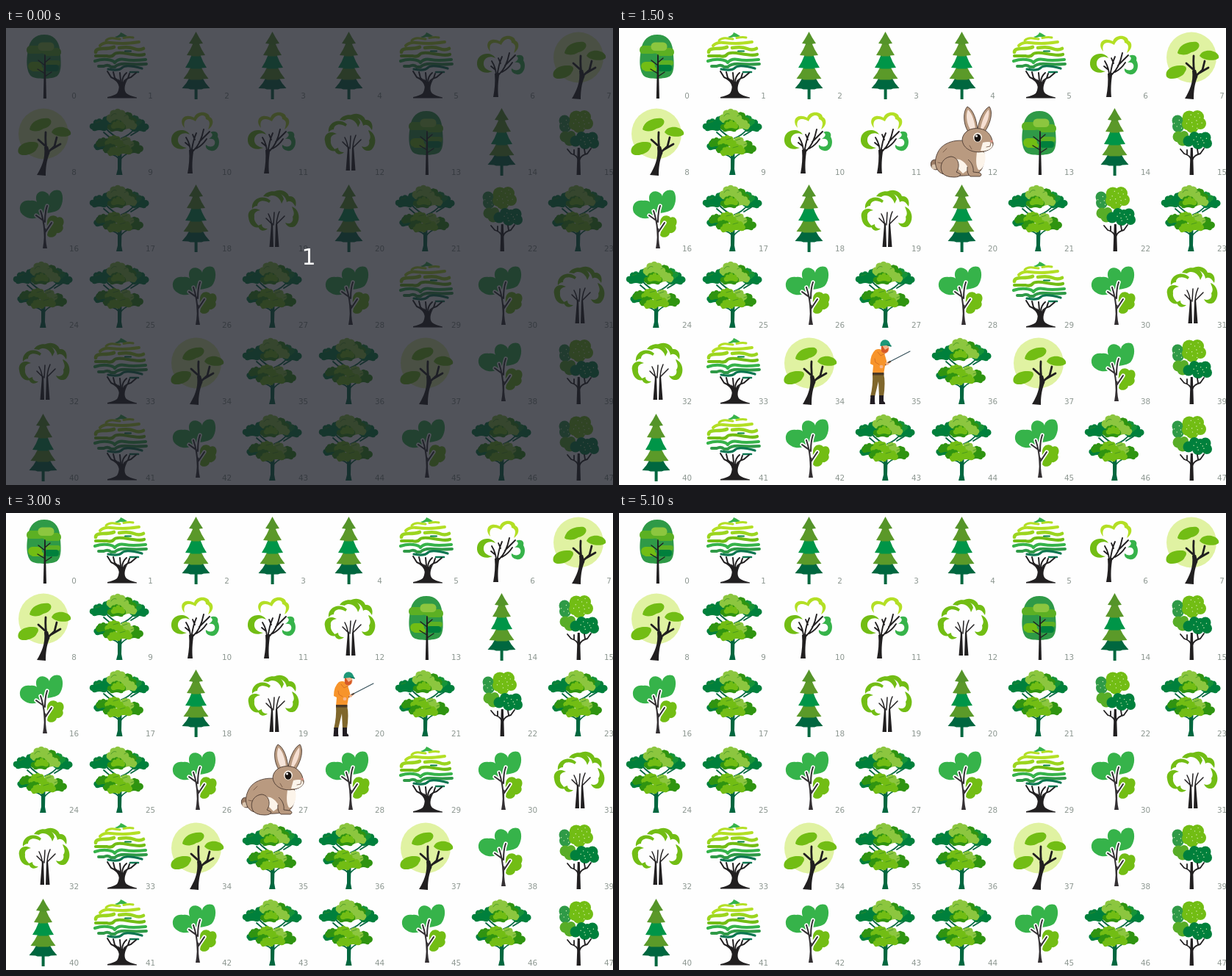
These frames come from a looping animation (826 px wide and 622 px high, 7400 ms). An HTML page:

```html
<!DOCTYPE html>
<html lang="en">
<head>
<meta charset="utf-8">
<title>Forest chase</title>
<style>
  html, body { margin: 0; width: 100%; height: 100%; overflow: hidden; background: #fefefe; }
  svg { display: block; width: 826px; height: 622px; }
  text { font-family: "DejaVu Sans", sans-serif; text-anchor: middle; }
</style>
</head>
<body>
<svg id="stage" viewBox="0 0 826 622" xmlns="http://www.w3.org/2000/svg"></svg>
<script>
const LOOP = 7400, STEP = 100, START = 300;
const COLS = 8, CELL = 104, COUNT = 48;
const FOREST = "ABCCCBDE" + "EFDDGACH" + "IFCGCFHF" + "FFIFIBIG" + "GBEFFEIH" + "CBIFFIFH";

const BARK = "#211f20", LIME = "#b3df25", LEAF = "#72bd14", LIGHT = "#8cc63f",
      GREEN = "#36b34a", MID = "#2f9a47", DEEP = "#00803c", TEAL = "#00673f", MOSS = "#2f9410";

const fill = (d, color) => `<path d="${d}" fill="${color}"/>`;
const line = (d, width, color = BARK) =>
  `<path d="${d}" fill="none" stroke="${color}" stroke-width="${width}" stroke-linecap="round" stroke-linejoin="round"/>`;
const oval = (x, y, rx, ry, color, turn = 0, extra = "") =>
  `<ellipse cx="${x}" cy="${y}" rx="${rx}" ry="${ry}" fill="${color}" transform="rotate(${turn} ${x} ${y})" ${extra}/>`;
const pill = (x, y, w, h, r, color) =>
  `<rect x="${x}" y="${y}" width="${w}" height="${h}" rx="${r}" fill="${color}"/>`;
const lobes = (color, ...circles) => circles.map(([x, y, r]) => oval(x, y, r, r, color)).join("");

// Leaf cloud with a scalloped dome and a shallow base
function cloud(left, top, right, base, color, bumps = 5) {
  const cx = (left + right) / 2, rx = (right - left) / 2 - 1, h = base - top - 3;
  let d = `M${left + 1} ${base - 2}`;
  for (let i = 1; i <= bumps; i++) {
    const a = Math.PI * (1 - i / bumps);
    const r = (Math.PI * (rx + h) / 2 / bumps * 0.56).toFixed(1);
    d += `A${r} ${r} 0 0 1 ${(cx + rx * Math.cos(a)).toFixed(1)} ${(base - 2 - h * Math.sin(a)).toFixed(1)}`;
  }
  return fill(d + `Q${right - 2} ${base + 1} ${cx + rx / 2} ${base}Q${cx} ${base - 2} ${cx - rx / 2} ${base}Q${left + 2} ${base + 1} ${left + 1} ${base - 2}Z`, color);
}

function dots(x, y, rx, ry, n) {
  let out = "";
  for (let i = 0; i < n; i++) {
    const a = i * 2.4, k = Math.sqrt((i + 0.6) / n) * 0.85;
    out += oval((x + rx * k * Math.cos(a)).toFixed(1), (y + ry * k * Math.sin(a)).toFixed(1), 0.7, 0.7, "#d8efb8");
  }
  return out;
}

function pillTree() {
  return fill("M52 9C64 9 72 16 73.5 31C75 47 76 59 70 65C64 70 41 70 35 66C28 61 27 45 30 30C32 16 40 9 52 9Z", MID)
    + fill("M33 24H45Q47 28 54 27H70Q75 28 75 33T70 38H55Q51 33 46 35H33Q28 35 28 30T33 24Z", "#5cb023")
    + pill(43.5, 19.5, 22, 11.5, 5.5, LIGHT)
    + pill(30, 46, 19, 12, 6, LEAF) + pill(34, 53, 17, 6, 3, LEAF)
    + pill(54, 44, 20, 7, 3.5, "#5cb023") + pill(53, 50, 19, 9, 4, DEEP)
    + line("M53 38V70M53 51L44 44M53 47L60 41M53 62L43 56M53 66L62 60", 1.4)
    + fill("M52.3 36H53.5L55 96H50.8Z", BARK);
}

function bonsai() {
  return fill("M44 12Q51 10 52 6Q55 7 61 11Q58 13 52 12Q47 14 44 12Z", GREEN)
    + line("M32 17Q36 13 43 14T51 15M56 13.5Q64 12 69 13", 3, LIME)
    + line("M24 24Q29 19 38 20T55 21T77 19", 4, LIME)
    + line("M18 33Q18 28 28 28T43 26M50 27Q63 25 70 28T83 28", 4.6, "#9bd51f")
    + line("M18 38H33Q40 40 43 36T62 35T84 36", 4.2, LEAF)
    + line("M58 31.5H66", 2, DEEP)
    + line("M17 45Q26 42 34 43T44 47Q49 41 58 43T86 43", 4.2, GREEN)
    + line("M22 52H29Q35 49 39 53H44Q49 48 61 49T87 49", 4, MID)
    + line("M35 56Q49 59 54 54T81 55", 3.2, "#0b7650")
    + line("M65 60H76", 2.6, "#0b7650")
    + line("M51 80Q49 71 39 67L34 59M51 74L44 68L42 60M54 80Q56 69 66 67L73 61M54 74Q54 66 60 61M62 68L64 62M52 72L51 61", 2)
    + fill("M48 69C51 76 50 85 47 89Q43 92 34 94V95.5H74V94.5Q64 92 60 89C56 85 57 77 62 69L55 75L53 73Z", BARK);
}

function pine() {
  // top, base, half-width above and below
  const tiers = [[68, 83, 9, 19, TEAL], [53, 70, 7, 17, "#5b9a29"], [37, 55, 6, 14.5, "#009548"], [21, 38, 4, 12.5, "#5b9829"], [5, 22, 0, 9.5, "#559429"]];
  return pill(48.6, 80, 4, 17, 0.5, TEAL) + tiers.map(([top, base, a, b, color]) =>
    fill(`M${50.5 - a} ${top}H${50.5 + a}Q${50.5 + (a + b) * .45} ${(top + base) / 2} ${50.5 + b} ${base - 1}`
      + `L${50.5 + b * .55} ${base - .5}L${50.5 + b * .4} ${base + .5}H${50.5 - b * .4}L${50.5 - b * .55} ${base - .5}L${50.5 - b} ${base - 1}`
      + `Q${50.5 - (a + b) * .45} ${(top + base) / 2} ${50.5 - a} ${top}Z`, color)).join("");
}

function heartOutline() {
  return fill("M35 32C26 22 34 11 48 18C51 8 68 9 69 17C76 20 74 30 67 34C70 26 70 22 64 20C64 13 54 13 50 23C40 17 32 20 35 32Z", LIME)
    + fill("M42 41C36 31 18 34 17 47C16 58 27 64 38 59C30 58 25 53 26 47C27 40 35 37 42 41Z", LEAF)
    + fill("M70 38C76 35 82 38 80 44C85 52 80 65 71 63C66 62 63 59 64 55C70 60 78 57 76 50C75 47 72 46 68 47C74 43 74 40 70 38Z", GREEN)
    + line("M43 69Q44 56 37 45M42 57L36 52M44 68Q46 50 51 39M49 48L46 41M47 63Q57 54 61 34M55 51L69 37M51 60Q59 56 65 47", 1.9)
    + fill("M41 62L47.5 61C45.5 74 45 83 46 94H39C41 83 42 73 41 62Z", BARK);
}

function sunTree() {
  return oval(51, 40, 34, 34.5, "#e0f2a2")
    + fill("M32 34C34 22 48 18 58 19C65 22 61 31 51 33C44 38 35 37 32 34Z", LEAF)
    + fill("M62 38C64 31 75 29 81 32C87 34 89 38 88 41C82 46 67 44 62 38Z", LEAF)
    + fill("M17 66C14 57 25 50 37 51C44 51 46 55 42 60C40 67 22 73 17 66Z", LEAF)
    + line("M56 68Q53 52 54 38M54 57L44 48M55 67L66 57L69 45M62 61L74 54", 2.8)
    + fill("M52 58L57 57L59.5 66C55 76 54 87 54 97L42 96C48 86 54 74 52 58Z", BARK);
}

function oak() {
  return line("M50 76C48 68 38 69 30 63M51 76Q56 68 68 64M49 46Q41 42 32 33M53 46Q64 42 70 34M36 44L29 38M66 42L76 36", 1.8, TEAL)
    + fill("M48 66H53.5L53 88L54.5 96H46L48 88Z", TEAL)
    + cloud(12, 19, 34, 36, DEEP) + cloud(25, 15, 43, 31, DEEP)
    + cloud(66, 19, 88, 37, DEEP) + cloud(62, 14, 79, 29, "#159437")
    + cloud(53, 9, 70, 30, MOSS) + cloud(34, 6, 62, 25, LIGHT)
    + cloud(53, 20, 74, 34, LIGHT) + cloud(36, 20, 57, 37, MOSS) + cloud(38, 23, 59, 33, LEAF)
    + cloud(16, 47, 38, 62, DEEP) + cloud(18, 45, 39, 58, MOSS)
    + cloud(61, 48, 80, 67, MOSS) + cloud(50, 43, 68, 60, LIGHT)
    + cloud(31, 42, 55, 58, LEAF) + cloud(28, 53, 48, 66, MOSS)
    + cloud(44, 54, 68, 68, LEAF) + cloud(34, 57, 53, 70, LEAF)
    + line("M39 16Q42 11 46 13M57 16L61 14M18 25L24 23M71 23L77 21M24 50L31 48M42 48L49 46M55 49L61 47M66 55L72 53M51 59L58 57", 0.7, "#388b22");
}

function cloudOutline() {
  return fill("M34 40C23 34 16 42 18 50C19 59 25 65 33 63C29 58 25 55 26 49C25 43 29 41 34 40Z", LEAF)
    + fill("M23 38C21 25 37 17 48 27L46 30C39 25 30 27 30 34Q26 34 23 38Z", LEAF)
    + fill("M38 21C45 10 64 13 66 25L63 31C61 22 51 17 45 22Z", LEAF)
    + fill("M51 16C60 9 71 14 73 21C81 20 84 28 82 35C78 28 74 26 70 29C69 21 62 16 51 16Z", LEAF)
    + fill("M77 35C88 39 89 54 82 61C78 65 70 63 68 57C74 60 80 56 78 49C82 44 78 39 77 35Z", LEAF)
    + fill("M31 61C32 68 39 70 44 65C39 65 36 63 36 59Z", LEAF)
    + line("M50 68Q50 54 45 45M49 58L42 51M56 68Q55 53 60 42M57 58L67 48M52 60L53 43", 1.5)
    + fill("M49 59L51 57L52 90H46.5ZM55 59L57 57L59.5 90H54Z", BARK);
}

function dottedTree() {
  return lobes(MID, [32, 22, 7.5], [33, 30, 8], [39, 25, 7])
    + lobes("#58ad27", [33, 44, 7.5], [39, 49, 7.5], [41, 42, 6])
    + lobes(LEAF, [48, 18, 9.5], [59, 17, 9], [63, 26, 8], [52, 30, 9], [46, 27, 8])
    + lobes(DEEP, [47, 50, 7.5], [55, 44, 7], [60, 53, 8], [70, 45, 7.5], [72, 53, 7], [63, 45, 6])
    + dots(55, 22, 15, 13, 12) + dots(34, 27, 8, 9, 5) + dots(63, 49, 14, 7, 8)
    + line("M51 76Q49 69 41 67L36 61M52 76Q54 69 63 67L68 60M45 68L45 62M60 67L59 61", 1.8)
    + fill("M49.8 59H52.8L54 96H48.5Z", BARK);
}

function heartTree() {
  const twigs = "M53 76Q52 55 47 41M52 55L41 47M53 56Q53 42 56 34M54 69L62 57";
  return fill("M48 46C41 54 27 53 20 43C16 33 23 25 33 27C38 26 41 28 42 29C38 18 46 12 53 15Q58 17 59 21C60 13 71 10 75 15C79 22 77 33 72 39C66 44 56 43 48 46Z", GREEN)
    + fill("M56 57C56 47 66 45 70 50C77 47 81 55 77 61C80 67 73 72 69 71C68 77 59 79 56 74C58 67 55 62 56 57Z", LEAF)
    + line(twigs, 5.4, "#fefefe") + line(twigs, 2.1, "#343033")
    + fill("M51.5 64L54.5 65C53.5 75 54 84 56 92H50C52 82 52 72 51.5 64Z", "#343033");
}

function rabbit() {
  const ink = `stroke="#49382f" stroke-width="0.9"`, fur = "#b99a80", cream = "#fcf4ea";
  const inked = (d, color) => `<path d="${d}" fill="${color}" ${ink}/>`;
  return oval(14.5, 82, 6, 7, "#9b7c65", -25, ink) + oval(13, 85, 3.5, 3.5, "#d8c4ae")
    + inked("M72 34C74 20 81 6 88 3C94 12 88 29 81 38Z", fur)
    + fill("M76 33C78 21 83 11 87 7C89 14 85 26 79 34Z", "#f6dfd2")
    + inked("M59 37C52 26 52 9 58 3C66 7 71 21 72 36Z", fur)
    + fill("M62 34C56 24 56 12 59 7C65 13 68 23 69 34Z", "#f6e5da")
    + inked("M56 50C42 47 24 52 18 65C11 79 15 92 26 95C43 99 64 97 72 94C82 87 82 72 80 62Z", fur)
    + fill("M71 65C77 66 81 63 82 68C84 78 79 90 73 89C69 83 70 73 71 65Z", cream)
    + fill("M36 78C43 71 54 75 60 88L52 94Z", cream)
    + inked("M24 93C19 83 25 72 36 71C46 72 49 84 43 92L49 95Q48 99 40 99Q28 99 24 93Z", fur)
    + inked("M59 75C64 79 67 86 66 92L75 93Q79 96 75 98H62Q57 94 58 85", fur)
    + inked("M51 48C52 37 63 31 75 33C84 34 91 42 92 50C96 56 89 63 80 64C66 67 52 61 51 48Z", fur)
    + fill("M79 52C86 50 94 51 92 57C89 62 83 64 76 63Z", cream)
    + oval(72, 45, 6, 6.5, cream) + oval(72, 45.5, 4.5, 5.2, "#17120f") + oval(70.5, 43, 1.5, 1.5, "#fff")
    + oval(91, 50, 2, 1.6, "#d99083") + line("M90 52L89 57L84 58M61 56L64 61M25 65L30 60M18 79L23 80", 0.8, "#6c5140");
}

function hunter() {
  const orange = "#f7942b", skin = "#f5b58c", khaki = "#80672c";
  return line("M44 46L57 38", 2.5, "#965329") + line("M53 40L84 24", 1.1, "#35505a")
    + fill("M33 54H48Q51 66 48 86H42L41 65L36 86H30Q34 70 33 54Z", khaki)
    + fill("M30.5 84H36V93Q37 96 36 96H29.5ZM42 84H48V92Q51 94 50 96H42Z", "#211c22")
    + fill("M37 22Q44 19 49 25L51 38L48 55H33L34 43L30 41Q30 28 37 22Z", orange)
    + fill("M33 53H48.5V56.5H33Z", "#4b3926")
    + oval(50, 20, 5.5, 7, skin)
    + fill("M45 14L48 19L50 22L55 19L54 24Q49 29 45 24Z", "#d65a27")
    + fill("M43.5 17C43 7 53 6 56 12L58.5 17L52 16Z", "#1d9878") + line("M53 15.5L58 17", 1.6, "#11775e")
    + line("M35 31L34 38L44 45M48 31L50 38", 4.5, orange)
    + line("M40 25L44 30L50 27M36 34L37 39L42 42", 0.8, "#cd6822")
    + oval(45, 45, 2.4, 2.2, skin) + oval(53, 41, 2.2, 1.8, skin);
}

const art = { A: pillTree, B: bonsai, C: pine, D: heartOutline, E: sunTree, F: oak, G: cloudOutline, H: dottedTree, I: heartTree, rabbit, hunter };
const stage = document.getElementById("stage");

function build() {
  let out = "<defs>";
  for (const name in art) out += `<g id="${name}">${art[name]()}</g>`;
  out += `</defs><rect width="826" height="622" fill="#fefefe"/>`;
  for (let i = 0; i < COUNT; i++) {
    const x = i % COLS * CELL, y = Math.floor(i / COLS) * CELL;
    out += `<use class="cell" href="#${FOREST[i]}" x="${x}" y="${y}"/>`
      + `<text x="${x + 92.5}" y="${y + 95.7}" font-size="10.4" fill="#8d9791">${i}</text>`;
  }
  stage.innerHTML = out + `<g id="cover"><rect width="826" height="622" fill="#1d2029" opacity=".77"/>`
    + `<text x="412" y="322" font-size="30" fill="#fff">1</text></g>`;
}

build();
const cells = [...stage.querySelectorAll(".cell")];
const cover = document.getElementById("cover");
let shown = null;

function draw(time) {
  const tick = Math.floor(time % LOOP / STEP);
  if (tick === shown) return;
  shown = tick;
  const step = tick - START / STEP;
  const active = step >= 0 && step < COUNT;
  cells.forEach((cell, i) => {
    const who = active && i === step ? "rabbit" : active && i === COUNT - 1 - step ? "hunter" : FOREST[i];
    cell.setAttribute("href", "#" + who);
  });
  cover.style.display = tick === 0 ? "" : "none";
}

const began = performance.now();
function loop() {
  draw(performance.now() - began);
  requestAnimationFrame(loop);
}
loop();
</script>
</body>
</html>
```
